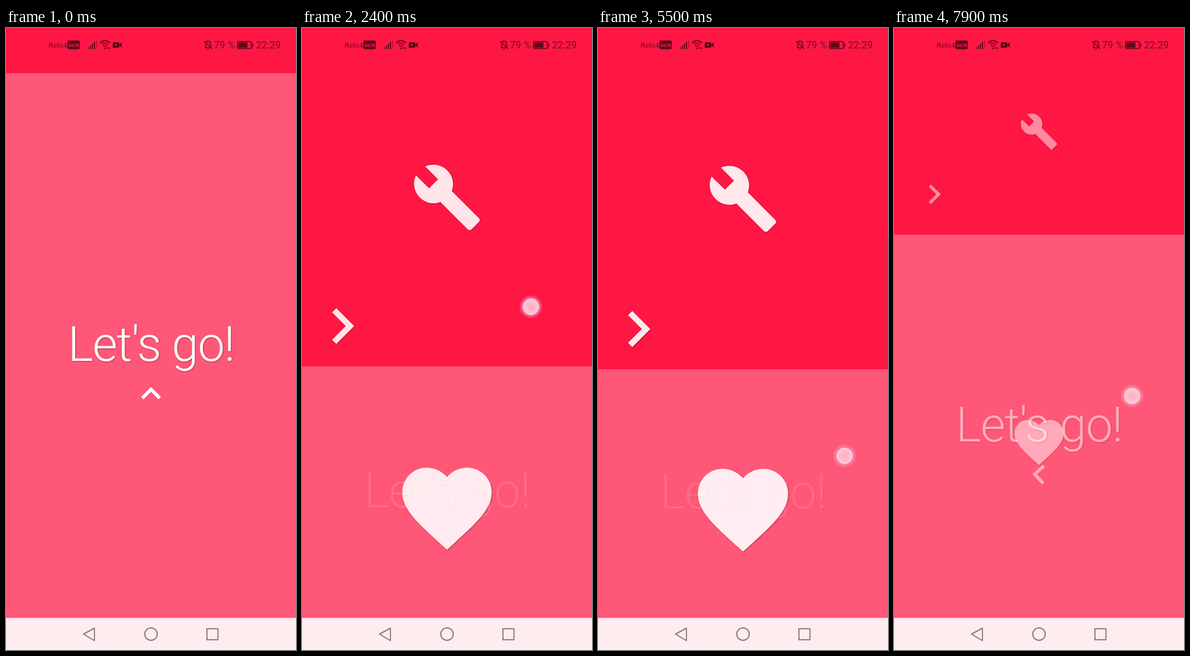
Recreate the animation shown at these times as an HTML page. Size 511x1095 px, loop 8000 ms.

```html
<!DOCTYPE html>
<html lang="en">
<head>
<meta charset="utf-8">
<title>Pull menu</title>
<style>
  html, body { margin: 0; width: 100%; height: 100%; overflow: hidden; background: #ff1744; }
  svg { display: block; width: 511px; height: 1095px; }
  text { font-family: Roboto, sans-serif; }
  .icon { fill: #fff; }
  .lift { filter: drop-shadow(1px 1px .8px rgba(70, 0, 20, .4)); }
  .title { font-size: 85px; font-weight: 300; letter-spacing: -.0156em; text-anchor: middle; }
  .status { fill: #7c0b23; }
  .dark { fill: #5e0b1e; }
  .line { fill: none; stroke: #65091d; stroke-width: 1.7; }
  .nav { fill: none; stroke: #86797d; stroke-width: 2; stroke-linejoin: round; }
</style>
</head>
<body>
<svg viewBox="0 0 511 1095">
  <defs>
    <radialGradient id="dot">
      <stop offset="0" stop-color="#ffacbc"/>
      <stop offset="1" stop-color="#ffc9d9"/>
    </radialGradient>
    <radialGradient id="halo">
      <stop offset=".7" stop-color="#ffc0d8" stop-opacity=".5"/>
      <stop offset="1" stop-color="#ffc0d8" stop-opacity="0"/>
    </radialGradient>
  </defs>

  <rect width="511" height="1095" fill="#ff1744"/>
  <rect id="panel" width="511" height="1000" fill="#ff5777"/>

  <g id="wrench" class="lift"><path class="icon" d="M22.7 19l-9.1-9.1c.9-2.3.4-5-1.5-6.9-2-2-5-2.4-7.4-1.3L9 6 6 9 1.6 4.7C.4 7.1.9 10.1 2.9 12.1c1.9 1.9 4.6 2.4 6.9 1.5l9.1 9.1c.4.4 1 .4 1.4 0l2.3-2.3c.5-.4.5-1.1.1-1.4z"/></g>
  <g id="heart" class="lift"><path class="icon" d="M12 21.35l-1.45-1.32C5.4 15.36 2 12.28 2 8.5 2 5.42 4.42 3 7.5 3c1.74 0 3.41.81 4.5 2.09C13.09 3.81 14.76 3 16.5 3 19.58 3 22 5.42 22 8.5c0 3.78-3.4 6.86-8.55 11.54z"/></g>
  <g id="arrow" class="lift"><path class="icon" d="M8.59 16.59 13.17 12 8.59 7.41 10 6l6 6-6 6z"/></g>
  <g id="title" class="lift"><text class="icon title" x="255.5">Let's go!</text></g>
  <g id="chevron"><path class="icon" d="M7.41 15.41 12 10.83l4.59 4.58L18 14l-6-6-6 6z"/></g>

  <g id="touch">
    <circle r="21" fill="url(#halo)"/>
    <circle r="15.2" fill="url(#dot)" stroke="#b8608f" stroke-opacity=".6" stroke-width="1.2"/>
  </g>

  <g class="status">
    <text x="75" y="34.5" font-size="13">Relo4</text>
    <rect class="dark" x="108" y="22" width="22" height="15.5" rx="2.5"/>
    <text x="119" y="32.8" font-size="7.5" font-weight="700" text-anchor="middle" fill="#ff1744" letter-spacing="-.4">VoLTE</text>
    <g class="dark">
      <path d="M144 34h2v3h-2zM147.600 31h2v6h-2zM151.200 28h2v9h-2zM154.800 25h2v12h-2z"/>
      <path d="M158.400 22h2v15h-2z" opacity=".4"/>
      <path d="M191 25h6.500q2 0 2 2v1.800l4.700-3.300v9l-4.700-3.300v1.800q0 2-2 2H190q-2 0-2-2v-6q0-2 2-2z"/>
      <circle cx="174.500" cy="35.500" r="1.700"/>
      <path d="M178 33.500h2v3.500h-2zM181.300 33.500h2v3.500h-2z" opacity=".8"/>
    </g>
    <circle cx="194" cy="30" r="1.500" fill="#ff1744"/>
    <path class="line" d="M165.500 26q9-7.500 18 0M168 29.300q6.500-5.300 13 0M171 32.300q3.500-2.800 7 0"/>
    <path class="line" d="M350 34.500h12M352 34v-6q0-5 4-5 4.500 0 4.500 5v6M354.500 37h3M349 23l14 13.500"/>
    <text x="366.500" y="36" font-size="17.500">79 %</text>
    <rect class="line" x="407.800" y="23.800" width="24.500" height="12.600" rx="2.500" stroke-width="1.400"/>
    <rect class="dark" x="409.500" y="25.500" width="16" height="9.200"/>
    <rect class="dark" x="433.500" y="26.500" width="2" height="7"/>
    <text x="440.500" y="36" font-size="17.500">22:29</text>
  </g>

  <rect y="1038.500" width="511" height="57" fill="#ffecef"/>
  <g class="nav">
    <path d="M136.500 1067 155.800 1056.500V1078.500z"/>
    <circle cx="255.500" cy="1067" r="11"/>
    <rect x="354" y="1057.500" width="19.500" height="19.500"/>
  </g>
</svg>
<script>
const LOOP = 8000, STEP = 100, MID = 255.5;
const el = id => document.getElementById(id);

// Goes from 0 to 1 between two times; the power sets the easing.
const grow = (t, from, to, power = 1) =>
  Math.min(1, Math.max(0, (t - from) / (to - from))) ** power;

// How far the panel is pulled down: open, nearly close, open again.
const pullAt = t => grow(t, 0, 2620, 1.355)
  - .89 * grow(t, 5000, 6960, 1.577)
  + .379 * grow(t, 6960, 7900, .73);

// How far the arrow is swiped: out, part way back, then released.
const slideAt = t => .7 * grow(t, 2900, 3300)
  - .22 * grow(t, 3300, 4100, .2)
  - .48 * grow(t, 4050, 4700, 2.6);

function fingerAt(t, p, q) {
  if (t >= 100 && t <= 2700) return [462 - 66 * p, 184 + 345.5 * p];
  if (t >= 2900 && t <= 4100) return [110 + 430 * q, 600];
  if (t < 5000) return null;
  const back = grow(t, 6960, 7900);
  return [439 - 5 * p - 17 * back, 495 + 288 * p + 12 * back];
}

function show(id, alpha, transform) {
  el(id).setAttribute('opacity', alpha);
  el(id).firstElementChild.setAttribute('transform', transform);
}

// Places a 24-unit icon by its centre.
const place = (id, x, y, size, turn, alpha) => show(id, alpha,
  `translate(${x} ${y}) rotate(${turn}) scale(${size / 24}) translate(-12 -12)`);

function draw(t) {
  const p = pullAt(t), q = slideAt(t);
  const edge = 79.5 + 581.5 * p, centre = (edge + 1039) / 2;
  const sway = -60 * Math.sin(2 * Math.PI * q);

  el('panel').setAttribute('y', edge);
  place('wrench', MID, edge / 2, 142 * p, 540 * q, p);
  place('arrow', 71 + 384 * q, edge - 71, 142 * p, 0, p);
  place('heart', MID + sway, centre + 27.5 + sway, 212.8 * p, 0, p);
  place('chevron', MID, centre + 84.5, 70, -180 * p, 1 - p);
  show('title', 1 - p, `translate(0 ${centre + 26.5})`);

  const finger = fingerAt(t, p, q);
  el('touch').style.display = finger ? '' : 'none';
  if (finger) el('touch').setAttribute('transform', `translate(${finger})`);
}

const start = performance.now();
function tick() {
  const t = Math.max(0, performance.now() - start) % LOOP;
  draw(Math.floor(t / STEP) * STEP);
  requestAnimationFrame(tick);
}
tick();
</script>
</body>
</html>
```
